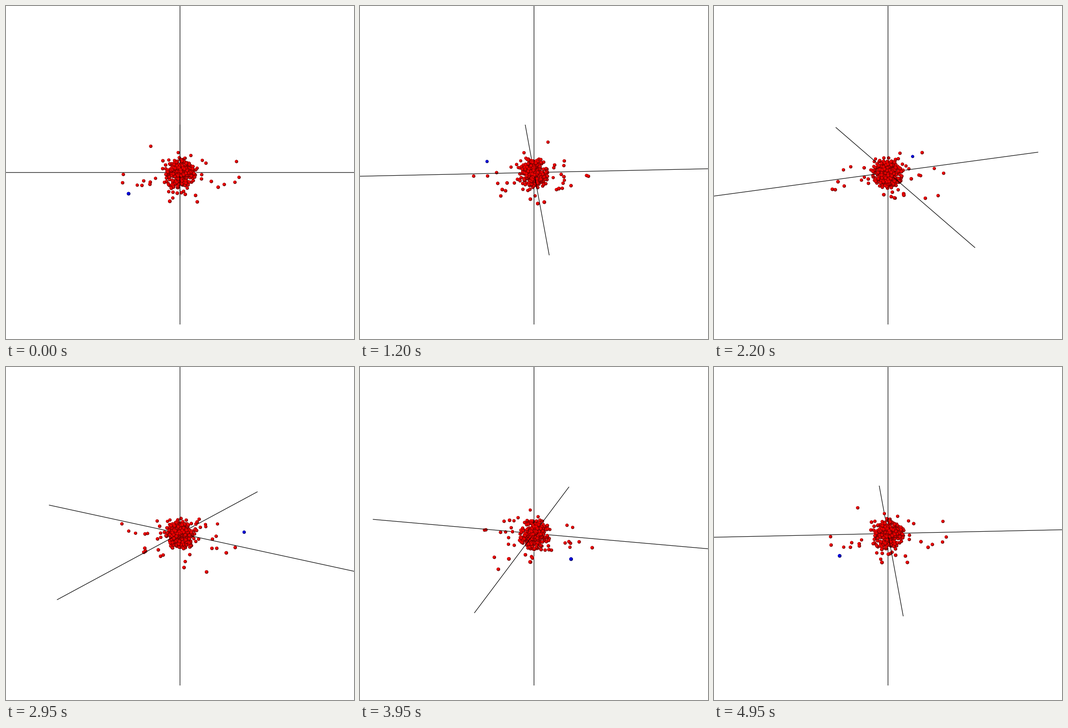
A matplotlib script for the animation above (5000 ms loop, 765 by 732 pixels).

```python
import numpy as np
import matplotlib.pyplot as plt
from matplotlib.animation import FuncAnimation

W, H, DPI = 765, 732, 100
FRAMES, INTERVAL = 100, 50
CX, CY = W / 2, H / 2
PX = 72 / DPI

# Camera: 30 degree view angle, 20 degrees above the ground plane
DIST = CY / np.tan(np.radians(15))
ARM = DIST / 3.5
SIN, COS = np.sin(np.radians(20)), np.cos(np.radians(20))
RADIUS = 3.75

# Far-flung points as (right, toward the viewer, up) at angle zero
OUTER = np.array([
    (-65, -36, 49), (-4, -67, 24), (24.5, -43, 25), (51, -60.5, 7.5),
    (57, -5, 20), (127.5, -42, 11), (131.5, -12.5, -16), (121.5, 0, -23),
    (97, 13.6, -23), (80, 71, -7), (66, 60.5, 2), (33, 63.5, -28.6),
    (36.4, 74, -39), (11, 80, -19.5), (-20.4, 133, -13), (-16, -3.5, -62),
    (-25, 1, -45), (-15, 43, -29.5), (-5.6, 102, -8), (3, 24.7, -38),
    (-126.6, -20, -12), (-124.5, 24, -15), (-98.5, -52, -50),
    (-83, 18, -23.5), (-80, 2, -19), (-64, 32, -10.5), (-64, 48.7, -9),
    (-57, -74, -41.5), (-36.7, 20, 34), (-25.7, -68.7, 5.5),
    (-37.7, 8, 11.8), (-33.6, 24, -14), (48, -5, -7), (47.7, -5, -17),
    (11.3, -115, -5.6), (12.5, -119, -7), (40, -77.5, -17.5),
    (-18, 82, -5), (12, -49, -37), (10, -62, -35), (15, -63, -21),
    (20, -58, 1.5), (-14, -45, 5), (-30, 37, 9), (-31, 16, 23),
    (-14, 36, -20.5), (8, 14, -39), (16, 10, -33),
])
BLUE = np.array([(-269.5, 266.6, -21.4)]) * 0.39


def make_core(count=350):
    rng = np.random.default_rng(12)
    rays = rng.normal(size=(count, 3))
    rays /= np.linalg.norm(rays, axis=1, keepdims=True)
    reach = 36 * rng.random(count) ** 0.75
    return rays * reach[:, None] + (0, 0, -2)


def make_axes(samples=520):
    line = np.linspace(-ARM, ARM, samples)
    axes = np.zeros((3, samples, 3))
    for i in range(3):
        axes[i, :, i] = line
    return axes.reshape(-1, 3)


def project(points, angle):
    """Return screen x, screen y, nearness and scale after the turn."""
    a, b, up = points.T
    right = a * np.cos(angle) - b * np.sin(angle)
    front = a * np.sin(angle) + b * np.cos(angle)
    near = front * COS + up * SIN
    scale = DIST / (DIST - near)
    return CX + right * scale, CY + (front * SIN - up * COS) * scale, near, scale


balls = np.vstack([make_core(), OUTER, BLUE])
axes_points = make_axes()
axis_len = len(axes_points) // 3
is_blue = np.arange(len(balls)) == len(balls) - 1

# Shading of a ball: relative radius, shift to the upper left, brightness
SHADES = np.array([(1, 0, 0.38), (0.88, 0.08, 0.62),
                   (0.74, 0.16, 0.83), (0.56, 0.22, 0.95)])
tints = np.zeros((len(balls), len(SHADES), 3))
tints[~is_blue, :, 0] = SHADES[:, 2]
tints[is_blue, :, 2] = SHADES[:, 2] * 0.95

fig = plt.figure(figsize=(W / DPI, H / DPI), dpi=DPI, facecolor="white")
ax = fig.add_axes([0, 0, 1, 1])
ax.set_xlim(0, W)
ax.set_ylim(H, 0)
ax.axis("off")
dots = ax.scatter(np.zeros(tints.size // 3), np.zeros(tints.size // 3),
                  linewidths=0, zorder=1)
lines, = ax.plot([], [], color="black", lw=1.25 * PX, zorder=2,
                 solid_capstyle="butt")


def hidden(x, y, near, ball):
    """Tell which axis samples lie behind the front surface of a ball."""
    bx, by, bnear, bscale = ball
    gap = (x[:, None] - bx) ** 2 + (y[:, None] - by) ** 2
    bulge = (RADIUS * bscale) ** 2 - gap
    cover = bnear + np.sqrt(np.maximum(bulge, 0))
    return ((bulge > 0) & (cover > near[:, None])).any(axis=1)


def draw(frame):
    angle = 2 * np.pi * frame / FRAMES
    ball = project(balls, angle)
    bx, by, bnear, bscale = ball
    order = np.argsort(bnear)
    radius = RADIUS * bscale[order, None]
    shift = radius * SHADES[:, 1]
    xs = bx[order, None] - shift
    ys = by[order, None] - shift
    dots.set_offsets(np.column_stack([xs.ravel(), ys.ravel()]))
    dots.set_sizes((2 * radius * SHADES[:, 0] * PX).ravel() ** 2)
    dots.set_facecolors(tints[order].reshape(-1, 3))

    x, y, near, _ = project(axes_points, angle)
    y = np.where(hidden(x, y, near, ball), np.nan, y)
    breaks = [axis_len, 2 * axis_len]
    lines.set_data(np.insert(x, breaks, np.nan), np.insert(y, breaks, np.nan))
    return dots, lines


anim = FuncAnimation(fig, draw, frames=FRAMES, interval=INTERVAL,
                     init_func=lambda: draw(0), repeat=True, repeat_delay=0)
plt.show()
```
